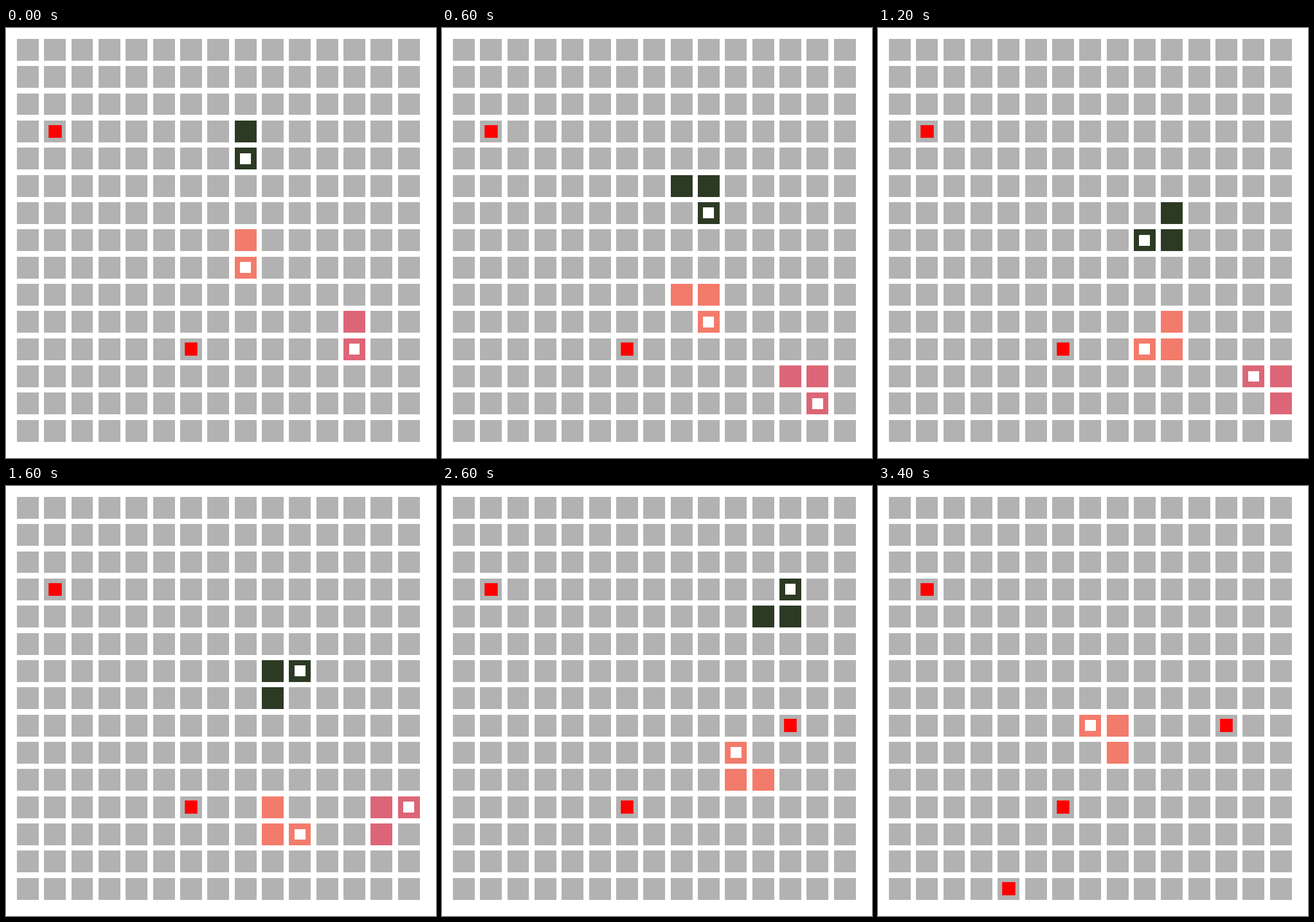
Recreate the animation shown at these times as an HTML page with a canvas. Size 748 px wide and 748 px high, loop 3.6 s.

```html
<!DOCTYPE html>
<html lang="en">
<head>
<meta charset="utf-8">
<title>Snakes</title>
<style>
  html, body { margin: 0; width: 100%; height: 100%; overflow: hidden; background: #fff; }
  canvas { display: block; width: 748px; height: 748px; }
</style>
</head>
<body>
<canvas id="board" width="748" height="748"></canvas>
<script>
const ctx = document.getElementById('board').getContext('2d');
const SIZE = 748, GRID = 15, UNIT = SIZE / 79;
const STEP = 200, STEPS = 18, LENGTH = 3;
const DIRS = { U: [0, -1], D: [0, 1], L: [-1, 0], R: [1, 0] };

// Each snake starts with its tail one cell above its head and is gone after its last move.
const snakes = [
  { color: '#2c3a24', head: [8, 4], moves: 'DRDRDLURURURURRD' },
  { color: '#f37b6b', head: [8, 8], moves: 'DRDRDLDRURULULLUL' },
  { color: '#dc6677', head: [12, 11], moves: 'DRDRULURU' }
];
const food = [
  { cell: [1, 3], from: 0 },
  { cell: [6, 11], from: 0 },
  { cell: [12, 8], from: 12 },
  { cell: [4, 14], from: 17 }
];

for (const s of snakes) {
  const [x, y] = s.head;
  s.path = [[x, y - 1], [x, y]];
  for (const m of s.moves) {
    const [px, py] = s.path[s.path.length - 1];
    s.path.push([px + DIRS[m][0], py + DIRS[m][1]]);
  }
}

// Fills a cell with its edges snapped to whole pixels; inset is in grid units.
function fillCell([col, row], color, inset = 0) {
  const edges = i => [2 + 5 * i + inset, 6 + 5 * i - inset].map(v => Math.round(v * UNIT));
  const [x0, x1] = edges(col), [y0, y1] = edges(row);
  ctx.fillStyle = color;
  ctx.fillRect(x0, y0, x1 - x0, y1 - y0);
}

function draw(step) {
  ctx.fillStyle = '#fff';
  ctx.fillRect(0, 0, SIZE, SIZE);
  for (let row = 0; row < GRID; row++)
    for (let col = 0; col < GRID; col++) fillCell([col, row], '#b2b2b2');

  for (const f of food) if (step >= f.from) fillCell(f.cell, '#f00', 0.8);

  for (const { color, path, moves } of snakes) {
    if (step > moves.length) continue;
    const end = step + 2;
    const body = path.slice(Math.max(0, end - LENGTH), end);
    body.forEach(c => fillCell(c, color));
    fillCell(body[body.length - 1], '#fff', 1);
  }
}

const start = performance.now();
let shown = -1;
function tick() {
  const step = Math.floor((performance.now() - start) / STEP) % STEPS;
  if (step !== shown) draw(shown = step);
  requestAnimationFrame(tick);
}
tick();
</script>
</body>
</html>
```
